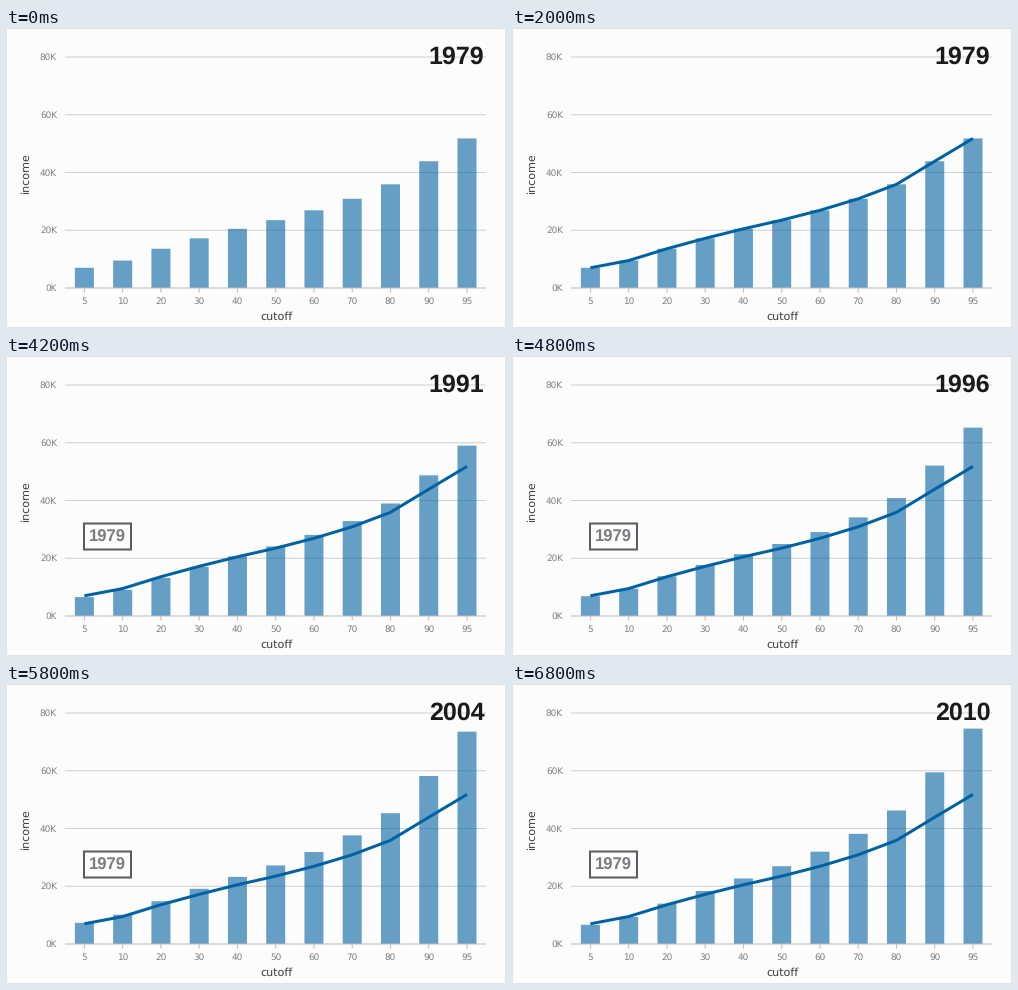
A matplotlib script that plays this animation: 500x300 px, repeating every 8 s.

```python
import numpy as np
import matplotlib.pyplot as plt
from matplotlib.animation import FuncAnimation
from matplotlib.patches import Rectangle

W, H, DPI = 500, 300, 100
STEP, FRAMES = 100, 80
BASE, UNIT = 260, 2.8875            # axis height and pixels per thousand
BG, BLUE = "#fcfcfc", "#0062a3"
GRID, AXIS, TICK = "#d0d0d0", "#bcbcbc", "#7e7e7e"

CUTOFFS = [5, *range(10, 91, 10), 95]
START = np.array([7, 9.5, 13.6, 17.2, 20.5, 23.5, 26.9, 30.9, 35.9, 43.9, 51.8])
X = 78.4 + 38.26 * np.arange(len(CUTOFFS))
RANK = np.linspace(0, 1, len(CUTOFFS))

# Key moments: time in ms, year, then growth as level + tilt*rank + top*rank^6
KEYS = np.array([
    [3500, 1979, 0, 0, 0],
    [3600, 1986, -0.018, 0.042, 0.007],
    [4200, 1991, -0.065, 0.18, 0.024],
    [5200, 2000, 0.01, 0.144, 0.186],
    [5800, 2004, 0.045, 0.22, 0.155],
    [6800, 2010, -0.05, 0.39, 0.10],
])


def px(size):
    return size * 72 / DPI


plt.rcParams.update({"font.family": "DejaVu Sans", "path.snap": False,
                     "text.hinting": "no_hinting"})
fig = plt.figure(figsize=(W / DPI, H / DPI), dpi=DPI, facecolor=BG)
ax = fig.add_axes([0, 0, 1, 1])
ax.axis("off")


def label(x, y, text, size, color, **kw):
    kw = {"ha": "center", "va": "baseline", **kw}
    return ax.text(x, y, text, fontsize=px(size), color=color, **kw)


def rule(xs, ys, color, z=1):
    ax.plot(xs, ys, color=color, lw=px(1), zorder=z, solid_capstyle="butt")


def box(x, y, w, h, lw, **kw):
    return ax.add_patch(Rectangle((x, y), w, h, lw=px(lw), **kw))


box(0.5, 0.5, W - 1, H - 1, 1, fill=False, ec="#e2e2e2")

for k in range(0, 81, 20):
    y = BASE - k * UNIT
    rule([59, 480], [y, y], GRID if k else AXIS, 1 if k else 3)
    label(51, y + 3, f"{k}K", 8.9, TICK, ha="right")

for x, c in zip(X, CUTOFFS):
    rule([x, x], [BASE, BASE + 4.5], AXIS)
    label(x, 275.5, c, 8.9, TICK)

label(270, 292, "cutoff", 11.1, "#3c3c3c")
label(19.5, 144.5, "income", 11.1, "#3c3c3c", rotation=90, va="center")

bars = ax.bar(X, -START * UNIT, 19, BASE, color=BLUE, alpha=0.6, lw=0, zorder=2)
ax.set(xlim=(0, W), ylim=(H, 0))

trend, = ax.plot([], [], color=BLUE, lw=px(3), zorder=4,
                 solid_capstyle="butt", solid_joinstyle="round")
bold = {"weight": "bold", "family": "Liberation Sans", "zorder": 6}
year_text = label(450.5, 36, "1979", 25, "#1a1a1a", **bold)
tag_box = box(78, 167.5, 47, 26, 2, fc=BG, ec="#5c5c60", zorder=5)
tag = label(101.5, 185.8, "1979", 16.6, "#7d7d7f", **bold)

LINE_Y = BASE - START * UNIT
ARC = np.r_[0, np.cumsum(np.hypot(np.diff(X), np.diff(LINE_Y)))]


def draw_trend(t):
    u = np.clip((t - 500) / 1500, 0, 1)
    reach = ARC[-1] * (1 - (1 - u) ** 2)
    inner = ARC < reach
    trend.set_data(np.r_[X[inner], np.interp(reach, ARC, X)],
                   np.r_[LINE_Y[inner], np.interp(reach, ARC, LINE_Y)])
    trend.set_visible(u > 0)


def update(i):
    t = i * STEP
    draw_trend(t)

    fade = np.clip((t - 2100) / 400, 0, 1)
    tag_box.set_alpha(fade)
    tag.set_alpha(fade)

    year, level, tilt, top = (np.interp(t, KEYS[:, 0], col)
                              for col in KEYS.T[1:])
    year_text.set_text(f"{year:.0f}")
    income = START * (1 + level + tilt * RANK + top * RANK ** 6)
    for bar, value in zip(bars, income):
        bar.set_height(-value * UNIT)
    return [trend, tag_box, tag, year_text, *bars]


anim = FuncAnimation(fig, update, frames=FRAMES, interval=STEP,
                     init_func=lambda: update(0), repeat=True,
                     repeat_delay=0, blit=False)
plt.show()
```
